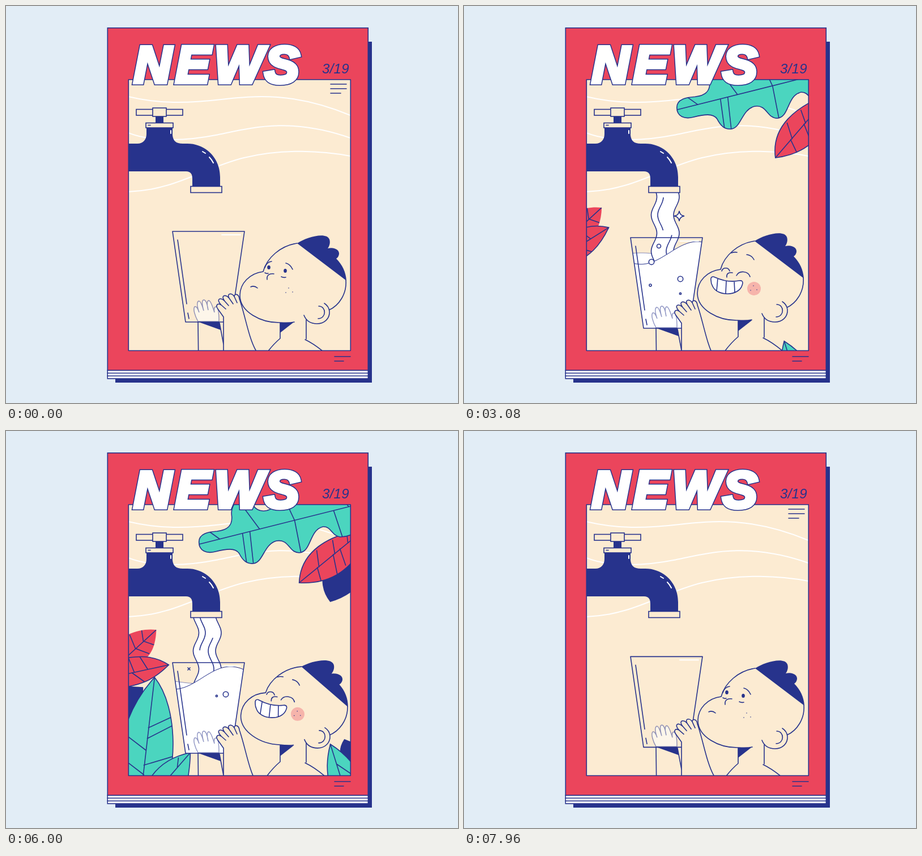
Animation, 798 px wide and 701 px high, one loop 8 s. Source, as an HTML page:

```html
<!DOCTYPE html>
<html lang="en">
<head>
<meta charset="utf-8">
<title>Magazine cover</title>
<style>
html, body { margin: 0; height: 100%; overflow: hidden; background: #e2edf6; }
svg { display: block; width: 100vw; height: 100vh; }
.line, .line * { fill: none; stroke: #27338c; stroke-width: 1.6; stroke-linecap: round; stroke-linejoin: round; }
.white, .white * { fill: none; stroke: #fff; stroke-width: 2; stroke-linecap: round; }
.ink { fill: #27338c; }
.skin { fill: #fcebd2; }
.box { fill: #fcebd2; stroke: #27338c; stroke-width: 1.6; }
.title { font: italic 700 91px 'Liberation Sans', Arial, sans-serif; stroke-linejoin: miter; }
</style>
</head>
<body>
<svg viewBox="0 0 798 701">
  <defs id="defs">
    <clipPath id="panel"><rect x="216" y="130" width="392" height="478.500"/></clipPath>
    <clipPath id="cup"><path d="M294 300H421V409L398 569H317L294 409Z"/></clipPath>
  </defs>

  <rect class="ink" x="193" y="63" width="453" height="602"/>
  <rect x="179.300" y="643.300" width="460" height="14.700" fill="#fff" stroke="#27338c" stroke-width="1.6"/>
  <path class="line" d="M179 648.300H639M179 653.300H639"/>
  <rect x="179.300" y="38.700" width="460" height="604.600" fill="#eb455c" stroke="#27338c" stroke-width="1.6"/>

  <g clip-path="url(#panel)">
    <rect class="skin" x="216" y="130" width="392" height="479"/>
    <path class="white" d="M216 160C270 173 320 172 380 165S510 152 608 193M216 224C250 238 310 240 370 228S500 195 608 233M216 328C300 325 350 285 420 268S560 256 608 265"/>
    <path class="line" d="M573 138H601M573 146H601M573 154H591"/>
    <g id="leaves"></g>

    <!-- tap -->
    <path class="ink" d="M216 243H232C242 243 248 236 248 226V215H294V228C295 238 300 243 312 243H320C352 243 378 268 378 302V318H329V305C329 297 326 292 318 292H216Z"/>
    <path class="white" d="M291 220V225M347 257L352 260M359 267Q363 271 366 277"/>
    <rect class="ink" x="264" y="195" width="14" height="11"/>
    <rect class="box" x="230" y="182.500" width="82" height="10.500"/>
    <rect class="box" x="259" y="180" width="24" height="15"/>
    <rect class="box" x="247" y="206.500" width="48" height="8.500"/>
    <path class="line" d="M251 210.500H255"/>

    <!-- boy -->
    <g id="body">
      <path class="skin" d="M484 540H530V588L575 620H450L484 587Z"/>
      <path class="ink" d="M484 556H511L484 577Z"/>
      <path class="line" d="M484 558V587Q472 597 460 613M530 552V588M528 589Q545 597 566 615"/>
    </g>
    <g id="head">
      <path class="skin" d="M514 419C485 423 460 445 454 469C430 472 413 490 413 511C413 540 450 560 485 559H509L560 545C590 532 603 510 600 484Z"/>
      <path class="line" d="M514 419C485 423 460 445 454 469C430 472 413 490 413 511C413 540 450 560 485 559Q500 560 509 558M600 484C602 508 588 529 570 537"/>
      <path class="ink" d="M514 419C530 408 566 398 571 412C573 418 571 424 568 428C580 425 589 431 588 438C587 443 585 445 583 446C594 457 600 470 601 485Z"/>
    </g>
    <g id="ear">
      <path class="skin" d="M526 545C530 556 538 561 549 561C562 561 572 552 571 539Q570 530 562 524L535 530Z"/>
      <path class="line" d="M526 546C530 556 538 561 549 561C562 561 572 552 571 539Q570 530 562 525M552 530C566 530 566 552 551 552"/>
    </g>
    <g id="sad">
      <g class="ink">
        <ellipse cx="464" cy="461.500" rx="2.800" ry="3.500"/>
        <ellipse cx="493" cy="467.500" rx="2.800" ry="3.500"/>
        <circle cx="499" cy="498" r=".8"/><circle cx="494" cy="506" r=".8"/><circle cx="506" cy="505" r=".8"/>
      </g>
      <path class="line" d="M457 462Q460 452 469 451M494 454Q502 456 506 465M457 471Q460 473 463 472M486 478Q490 480 494 479M461 483C460 475 465 472 473 473M432 496Q438 493 444 498"/>
    </g>
    <g id="happy">
      <circle cx="512" cy="499" r="12" fill="#f6b4ab"/>
      <g class="ink"><circle cx="511" cy="494" r=".8"/><circle cx="506" cy="502" r=".8"/><circle cx="517" cy="501" r=".8"/></g>
      <path d="M436 484C435 478 439 477 443 479Q465 489 486 485C492 484 493 488 491 493C485 513 447 513 439 495Q436 490 436 484Z" fill="#fff"/>
      <path class="line" d="M436 484C435 478 439 477 443 479Q465 489 486 485C492 484 493 488 491 493C485 513 447 513 439 495Q436 490 436 484ZM448 481L446 503M463 486L462 508M477 486L478 505M455 468C457 461 467 461 469 468M481 476C486 466 502 468 505 478M464 479C463 472 468 470 474 471M472 436Q477 434 482 435M499 439Q508 440 512 448"/>
    </g>

    <!-- water behind the glass front -->
    <g id="flow" clip-path="url(#cup)">
      <path id="back" fill="#fff" stroke="#27338c" stroke-opacity=".55"/>
      <path id="stream" fill="#fff"/>
      <path id="edges" class="line"/>
      <path id="front" fill="#fff" stroke="#27338c"/>
    </g>
    <rect class="box" x="326" y="318.500" width="55" height="11"/>
    <g id="drop"><path d="M0 -9C2 -4 4 -1 4 2A4 4 0 0 1 -4 2C-4 -1 -2 -4 0 -9Z" fill="#fff" stroke="#27338c" stroke-width="1.500"/></g>

    <!-- glass, hands and arms -->
    <g id="glass">
      <path class="skin" d="M339 558H378L384 597V640H340Z"/>
      <path class="ink" d="M340 558H377L379 572Z"/>
      <path class="line" d="M339 558L340 640M377 560L384 597"/>
      <path d="M339 557C333 546 330 535 333 531Q337 529 341 541Q335 524 340 521Q344 520 349 538Q344 520 349 519Q354 518 357 537Q353 521 358 520Q362 521 368 541Q366 531 371 531Q376 532 376 557Z" fill="#fff" fill-opacity=".55" stroke="#27338c" stroke-opacity=".5" stroke-width="1.500"/>
      <path class="white" d="M381 404H414"/>
      <path class="line" d="M384 558H317L294 398H421L403 520M303 413L319 526M321 542L323 552"/>
      <path class="skin" d="M384 640V549L374 535C370 529 373 526 376 525C372 519 376 515 382 517C381 511 388 509 391 512C393 508 399 508 402 511C405 507 411 509 412 517C422 545 428 590 452 640Z"/>
      <path class="line" d="M384 640V549L374 535C369 528 374 524 380 528L388 535M380 528C370 518 378 513 386 521L393 529M386 521C378 511 388 508 394 516L401 526M394 516C389 507 399 506 403 513L408 524M403 513C403 507 411 508 412 517C422 545 428 585 441 608L452 640"/>
    </g>
    <g id="sparks"></g>
  </g>

  <rect class="line" x="216.300" y="130" width="392" height="478.500"/>
  <path class="line" d="M580 619H608M580 627H596"/>
  <text x="558" y="119" class="ink" font-family="'Liberation Sans', Arial, sans-serif" font-style="italic" font-size="24" letter-spacing=".3">3/19</text>
  <!-- heavy title: a wide outline in blue under a slightly narrower one in white -->
  <g class="title">
    <text x="226 299.500 368 457" y="135" fill="#27338c" stroke="#27338c" stroke-width="10">NEWS</text>
    <text x="226 299.500 368 457" y="135" fill="#fff" stroke="#fff" stroke-width="7" aria-hidden="true">NEWS</text>
  </g>
</svg>
<script>
const LOOP = 8000, TAU = Math.PI * 2;
const RED = '#eb455c', TEAL = '#4bd5bf', BLUE = '#27338c';
const $ = id => document.getElementById(id);
const clamp = v => Math.max(0, Math.min(1, v));
const set = (id, name, value) => $(id).setAttribute(name, value);
const show = (id, on) => set(id, 'visibility', on ? 'visible' : 'hidden');

function add(parent, tag, attrs) {
  const el = document.createElementNS('http://www.w3.org/2000/svg', tag);
  for (const k in attrs) el.setAttribute(k, attrs[k]);
  return parent.appendChild(el);
}

// move: dx, dy, turn, pivot x, pivot y of the hidden pose; late leaves wait for the others
const leaves = [
  { fill: BLUE, late: .4, side: 1, move: [70, -20, 0, 0, 0],
    d: 'M573 301C560 285 555 262 565 240L650 210C645 260 612 290 573 301Z' },
  { fill: RED, late: 0, side: 1, move: [246, 0, -77, 518, 268],
    d: 'M518 268C520 215 565 183 640 172C628 225 590 272 518 268Z',
    veins: 'M518 268L640 168M549 211L553 240M577 193L581 217M602 180L604 198M550 241L557 266M578 218L585 252M590 208L600 237' },
  { fill: TEAL, late: 0, side: 1, move: [269, -130, 0, 0, 0],
    d: 'M341 196C341 181 358 178 373 177C393 175 400 166 399 151C397 138 402 132 405 125C410 115 430 118 436 130C445 145 465 145 475 130L520 60H700V130C640 150 625 188 590 187C575 185 575 168 560 169C535 175 540 214 518 215C500 215 500 190 478 194C455 200 455 232 437 234C425 235 418 228 412 216C405 206 390 208 370 213C355 217 341 212 341 196Z',
    veins: 'M341 200L700 110M357 176L378 191M422 138L448 173M418 181L425 232M431 178L437 233M495 126L510 158L521 214M579 141L594 186M594 120L605 133' },
  { fill: BLUE, late: .4, side: -1, move: [-50, 0, 0, 0, 0],
    d: 'M190 450L241 453C242 480 230 500 200 525Z' },
  { fill: RED, plain: 1, late: 0, side: -1, move: [-169, 38, 0, 0, 0],
    d: 'M265 351C245 349 228 353 210 362L190 420L246 402C258 392 264 375 265 351Z',
    veins: 'M265 351L205 406M239 351L242 371L262 378M218 360L228 384L252 393' },
  { fill: RED, late: 0, side: -1, move: [-246, -169, -154, 287, 412],
    d: 'M287 413C260 395 235 396 190 404V455C240 450 262 438 287 413Z',
    veins: 'M287 413L190 434M236 399L250 421M216 401L226 426M222 427L250 447' },
  { fill: TEAL, late: .4, side: -1, move: [-60, 190, 0, 0, 0],
    d: 'M262 435C225 475 190 540 200 640L270 660C302 610 306 490 262 435Z',
    veins: 'M262 435L237 650M290 506L251 524M296 519L249 543M300 573L243 590M205 532L247 564M205 578L243 607' },
  { fill: TEAL, late: .4, side: -1, move: [-30, 70, 0, 0, 0],
    d: 'M325 568C295 574 268 588 250 620L316 640C322 610 325 590 325 568Z',
    veins: 'M325 568L285 614M304 577L302 594' },
  { fill: BLUE, late: .4, side: 1, move: [30, 40, 0, 0, 0],
    d: 'M598 545C588 560 588 577 600 592L650 600V565Z' },
  { fill: TEAL, late: 0, side: 1, move: [-60, 300, 0, 0, 0],
    d: 'M573 553C566 580 566 600 572 630L650 650C622 592 600 570 573 553Z',
    veins: 'M573 553L594 620M584 588L615 609' }
];
leaves.forEach((leaf, i) => {
  leaf.el = add($('leaves'), 'g', {});
  const blade = { d: leaf.d, fill: leaf.fill, stroke: leaf.plain ? 'none' : BLUE, 'stroke-width': 1.6 };
  add(leaf.el, 'path', blade);
  if (!leaf.veins) return;
  add(add($('defs'), 'clipPath', { id: 'leaf' + i }), 'path', { d: leaf.d });
  add(leaf.el, 'path', { d: leaf.veins, class: 'line', 'clip-path': `url(#leaf${i})` });
});

// x, y, dx, dy per cycle, shape, birth, death
const STAR = 'M0 -9Q1 -1 9 0Q1 1 0 9Q-1 1 -9 0Q-1 -1 0 -9Z';
const CROSS = 'M-2.500 -2.500L2.500 2.500M2.500 -2.500L-2.500 2.500';
const ring = r => `M${-r} 0A${r} ${r} 0 1 1 ${r} 0A${r} ${r} 0 1 1 ${-r} 0Z`;
const sparks = [
  [380, 371, -14, -279, STAR, -.2, .1],
  [382, 482, 13, -37, ring(4.7), -.08, .6],
  [397, 482, 0, -20, ring(4.7), .65, .92],
  [382, 508, -22, -87, ring(1.6), -.1, .6],
  [344, 424, 10, -120, ring(3.5), -.12, .12],
  [331, 452, -10, -60, ring(4.7), -.12, .15],
  [329, 493, 0, -90, ring(2), -.12, .25],
  [323, 438, 0, -39, CROSS, .34, .6]
].map(([x, y, dx, dy, d, from, to]) => ({
  x, y, dx, dy, from, to,
  el: add($('sparks'), 'path', { d, fill: d === CROSS ? 'none' : '#fff', stroke: BLUE, 'stroke-width': 1.6 })
}));

function drawLeaves(q, t) {
  const sway = 1 + 1.4 * Math.sin(TAU * (t - 3080) / 4000);
  for (const { el, late, side, move: [dx, dy, turn, px, py] } of leaves) {
    const away = (1 - clamp((q - late) / (1 - late))) ** 4;
    const sx = side * sway * clamp(q * 2 - .8);
    el.setAttribute('transform', `translate(${dx * away + sx} ${dy * away}) rotate(${turn * away} ${px} ${py})`);
    el.setAttribute('visibility', q > 0 && away < 1 ? 'visible' : 'hidden');
  }
}

function drawWater(t) {
  const fill = clamp((t - 2550) / 450) * clamp((7600 - t) / 400);
  const level = 590 - 154 * fill;
  const top = 329 + 250 * clamp((t - 7350) / 200);
  const head = 329 + 250 * clamp((t - 2450) / 150);
  const end = Math.min(head, level + 34, 566);
  const s = t - 3080;

  const points = (x, from, to) => {
    const list = [];
    for (let y = from; y < to; y += 3)
      list.push(`${(x + 5 * Math.cos(TAU * ((y - 337) / 64 - s / 400))).toFixed(1)} ${y.toFixed(1)}`);
    return list;
  };
  const line = (x, from, to) => {
    const list = points(x, from, to);
    return list.length > 1 ? 'M' + list.join('L') : '';
  };
  const left = points(335.5, top, end), right = points(375, top, end);
  const pulse = Math.cos(TAU * (s / 800 - .07));
  const mid = 364 + 5 * pulse;
  set('stream', 'd', left.length > 1 ? 'M' + left.concat(right.reverse()).join('L') + 'Z' : '');
  set('edges', 'd', line(335.5, top, end) + line(375, top, end) +
    line(347, Math.max(top, mid - 30), Math.min(end, mid + 30)) +
    line(362, Math.max(top, 385 + 22 * pulse), end));

  const surface = (y, amp, crest, period) => {
    let d = 'M280 620';
    for (let x = 280; x <= 435; x += 3)
      d += `L${x} ${(y - amp * Math.cos(TAU * ((x - crest) / 200 - s / period))).toFixed(1)}`;
    return d + 'L435 620Z';
  };
  set('front', 'd', fill ? surface(level, 20, 412, 1000) : '');
  set('back', 'd', fill ? surface(level + 5, 5, 312, 800) : '');
}

function draw(t) {
  const wet = t >= 2450 && t < 7640;
  const glad = t >= 2450 && t < 7600;
  const q = Math.min(clamp((t - 2400) / 1700), clamp((7640 - t) / 1400));

  drawLeaves(q, t);
  show('flow', wet);
  if (wet) drawWater(t);

  const clock = t > 5000 ? t - LOOP : t;
  const dip = wet ? 11 : 5.5 * (1 - Math.cos(TAU * clock / 700));
  set('glass', 'transform', `translate(0 ${dip})`);

  const turn = 3.7 * (1 - (1 - clamp((q - .4) / .6)) ** 4);
  const tilt = `rotate(${turn} 500 545)`;
  set('head', 'transform', glad ? tilt + ' translate(-1 -4)' : '');
  set('happy', 'transform', tilt);
  set('body', 'transform', `translate(0 ${glad ? -3 : 0})`);
  set('ear', 'transform', `translate(${glad ? turn / 4 : 0} ${glad ? -3 + turn / 2 : 0})`);
  show('happy', glad);
  show('sad', !glad);

  // single drip while the tap is dry
  const d = (clock + 1400) % 1400;
  const fall = clamp((d - 450) / 400);
  show('drop', !wet && d > 150 && fall < 1);
  set('drop', 'transform', `translate(354 ${334 + 216 * fall * fall}) scale(${clamp((d - 150) / 250)})`);

  const u = ((t - 3080) / 2000 % 1 + 1) % 1;
  for (const p of sparks) {
    const v = ((u - p.from) % 1 + 1) % 1 + p.from;
    const on = t > 2850 && t < 7300 && v < p.to;
    const size = clamp(Math.min(v - p.from, p.to - v) * 18);
    p.el.setAttribute('transform', `translate(${p.x + p.dx * v} ${p.y + p.dy * v}) scale(${size})`);
    p.el.setAttribute('visibility', on ? 'visible' : 'hidden');
  }
}

const start = performance.now();
function tick() {
  draw((performance.now() - start) % LOOP);
  requestAnimationFrame(tick);
}
tick();
</script>
</body>
</html>
```
